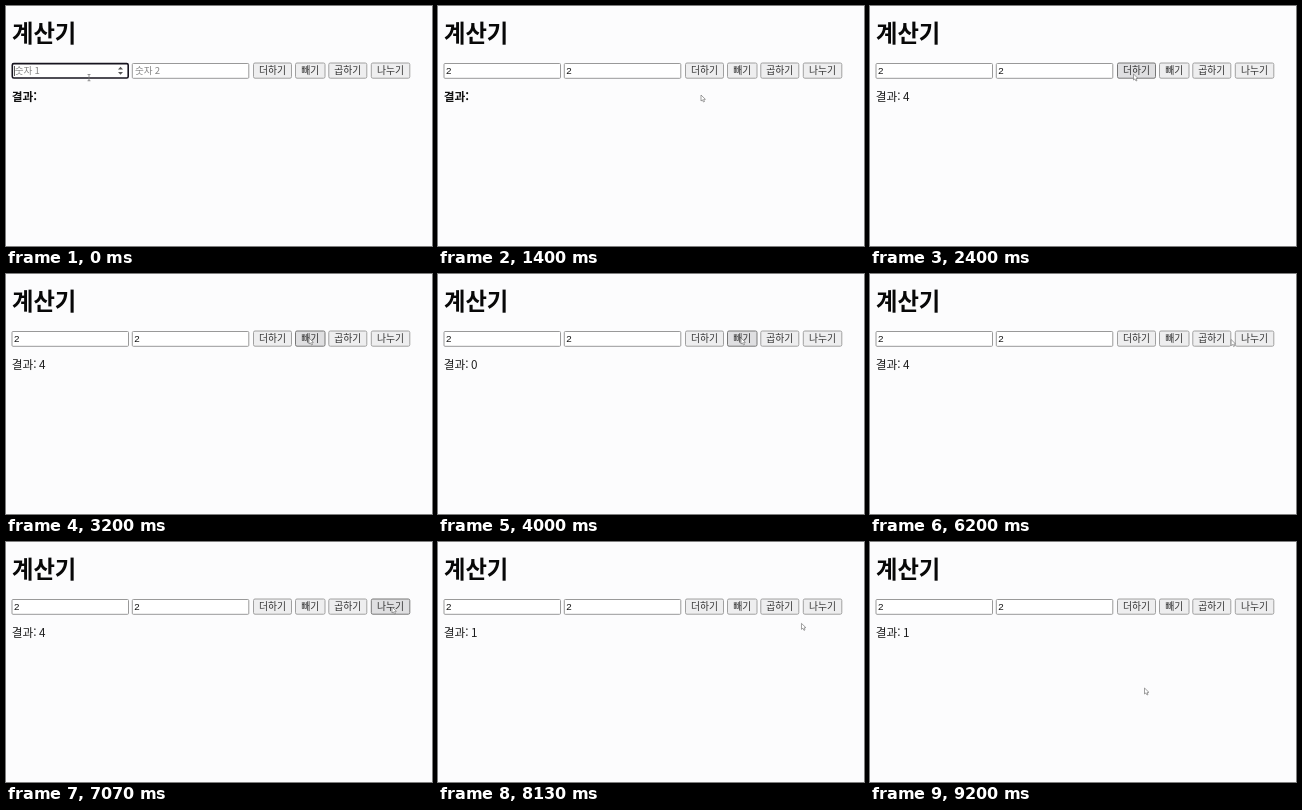
An HTML page with a canvas that plays this animation: 426 by 240 pixels, repeating every 9.27 s.

```html
<!DOCTYPE html>
<html lang="ko">
<head>
<meta charset="utf-8">
<style>
html, body { margin: 0; width: 100%; height: 100%; overflow: hidden; background: #fcfcfd; }
canvas { display: block; width: 426px; height: 240px; }
</style>
</head>
<body>
<canvas id="stage"></canvas>
<script>
const LOOP = 9270;
const HANGUL = '"Noto Sans CJK KR", "Noto Sans CJK JP", "Noto Sans CJK", sans-serif';
const ARIAL = '"Liberation Sans", ' + HANGUL;

const canvas = document.getElementById('stage');
const ratio = window.devicePixelRatio || 1;
canvas.width = 426 * ratio;
canvas.height = 240 * ratio;
const ctx = canvas.getContext('2d');
ctx.scale(ratio, ratio);

const fields = [
  { x: 6, w: 116.5, hint: '숫자 1', typedAt: 330, focus: [0, 700] },
  { x: 126.3, w: 116.5, hint: '숫자 2', typedAt: 930, focus: [700, 1330] }
];
const buttons = [
  { x: 247.5, w: 38, label: '더하기' },
  { x: 289.5, w: 29.5, label: '빼기' },
  { x: 322.8, w: 38, label: '곱하기' },
  { x: 365.3, w: 38.5, label: '나누기' }
];
const results = [[2070, '4'], [3530, '0'], [5670, '4'], [7530, '1']];

// Pointer stops: time, x, y
const path = [
  [0, 83, 68], [430, 83, 68], [670, 170, 66], [1000, 170, 66],
  [1330, 263, 89], [1600, 263, 89], [1900, 263.5, 68], [2700, 263.5, 68],
  [3150, 303, 64], [4250, 303, 64], [4750, 342, 66], [5950, 342, 66],
  [6500, 386, 65], [7900, 386, 65], [8700, 274.5, 146], [LOOP, 274.5, 146]
];

function pointerAt(t) {
  const i = path.findIndex(stop => stop[0] > t);
  const [t0, x0, y0] = path[i - 1], [t1, x1, y1] = path[i];
  const p = (t - t0) / (t1 - t0), e = p * p * (3 - 2 * p);
  return { x: x0 + (x1 - x0) * e, y: y0 + (y1 - y0) * e };
}

const inside = (p, box) => p.x >= box.x && p.x <= box.x + box.w && p.y >= 57 && p.y <= 73;

function text(str, x, y, size, color, family = HANGUL, weight = 400, align = 'left') {
  ctx.font = `${weight} ${size}px ${family}`;
  ctx.textAlign = align;
  ctx.fillStyle = color;
  ctx.fillText(str, x, y);
}

function box(x, y, w, h, r, fill, stroke, line) {
  ctx.beginPath();
  ctx.roundRect(x, y, w, h, r);
  ctx.fillStyle = fill;
  ctx.fill();
  ctx.strokeStyle = stroke;
  ctx.lineWidth = line;
  ctx.stroke();
}

function polygon(points, fill) {
  ctx.beginPath();
  points.forEach(([x, y]) => ctx.lineTo(x, y));
  ctx.closePath();
  ctx.fillStyle = fill;
  ctx.fill();
}

function drawField(f, t, pointer) {
  const focused = t >= f.focus[0] && t < f.focus[1];
  const typed = t >= f.typedAt;
  if (focused) box(f.x + .3, 57.6, f.w - .6, 14.4, 1.5, '#fff', '#17141f', 1.6);
  else box(f.x, 57.5, f.w, 14.8, 1, '#fff', '#999', 1);
  if (typed) text('2', f.x + 2, 68.3, 9.8, '#111', ARIAL);
  else text(f.hint, f.x + 2.7, 68.3, 9.6, '#858585');
  if (focused) {
    ctx.fillStyle = '#333';
    ctx.fillRect(f.x + (typed ? 8 : 2), 60, .8, 10);
  }
  if (focused || inside(pointer, f)) {
    const x = f.x + 108.5;
    polygon([[x - 2.5, 63.6], [x + 2.5, 63.6], [x, 60.8]], '#555');
    polygon([[x - 2.5, 66], [x + 2.5, 66], [x, 68.8]], '#555');
  }
}

function drawButton(b, pointer) {
  const hover = inside(pointer, b);
  box(b.x, 57, b.w, 15.2, 1.5, hover ? '#dfdfe1' : '#eeeeef', hover ? '#777' : '#a0a0a0', 1);
  text(b.label, b.x + b.w / 2, 68.2, 9.8, '#333', HANGUL, 400, 'center');
}

function drawPointer({ x, y }) {
  if (fields.some(f => inside({ x, y }, f))) {
    ctx.fillStyle = '#777';
    ctx.fillRect(x - .4, y, .8, 7);
    ctx.fillRect(x - 1.5, y, 3, .7);
    ctx.fillRect(x - 1.5, y + 6.5, 3, .7);
    return;
  }
  polygon([[x, y], [x, y + 6], [x + 1.4, y + 4.9], [x + 2.5, y + 7],
    [x + 3.5, y + 6.5], [x + 2.6, y + 4.5], [x + 4.4, y + 4.3]], '#fff');
  ctx.strokeStyle = '#777';
  ctx.lineWidth = .7;
  ctx.stroke();
}

function draw(t) {
  const pointer = pointerAt(t);
  ctx.fillStyle = '#fcfcfd';
  ctx.fillRect(0, 0, 426, 240);
  text('계산기', 6, 36.2, 23.3, '#080808', HANGUL, 700);
  fields.forEach(f => drawField(f, t, pointer));
  buttons.forEach(b => drawButton(b, pointer));
  const result = results.filter(([at]) => t >= at).pop();
  if (result) text('결과: ' + result[1], 5.7, 95.4, 11.7, '#1c1c1c');
  else text('결과:', 5.7, 95.4, 11.7, '#111', HANGUL, 700);
  drawPointer(pointer);
}

const start = performance.now();
function frame() {
  draw((performance.now() - start) % LOOP);
  requestAnimationFrame(frame);
}
frame();
</script>
</body>
</html>
```
